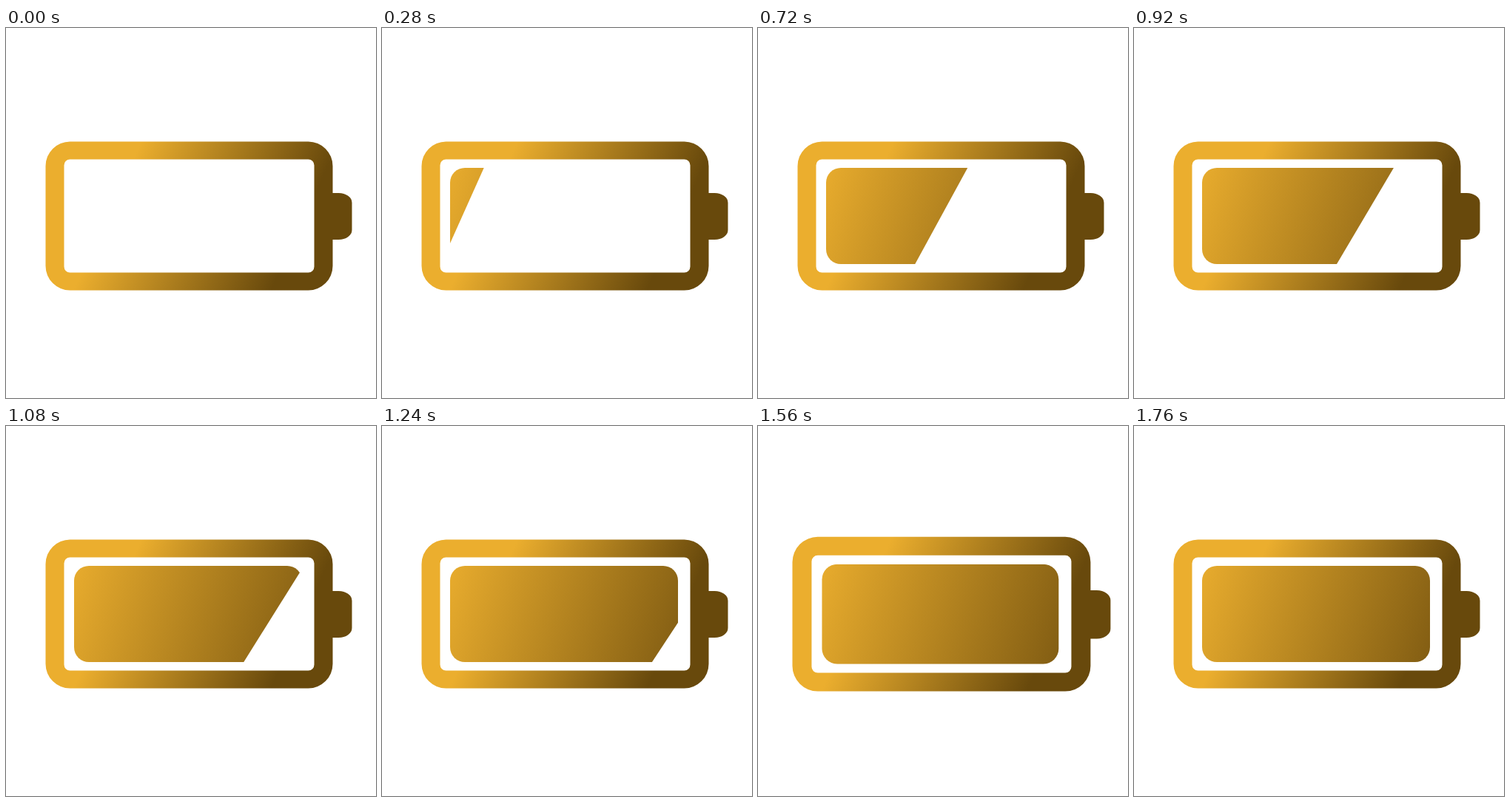
Animation of 500 by 500 pixels, one loop 1.92 s. Source, as an HTML page:

```html
<!DOCTYPE html>
<html lang="en">
<head>
<meta charset="utf-8">
<title>Charging battery</title>
<style>
  html, body { margin: 0; width: 100%; height: 100%; overflow: hidden; background: #fff; }
  svg { display: block; width: 100%; height: 100%; }
</style>
</head>
<body>
<svg viewBox="0 0 500 500">
  <defs>
    <linearGradient id="gold">
      <stop offset="0" stop-color="#ebae2e"/>
      <stop offset="1" stop-color="#68490c"/>
    </linearGradient>
    <linearGradient id="caseGold" href="#gold" gradientUnits="userSpaceOnUse" x1="179" y1="162" x2="400" y2="263"/>
    <linearGradient id="chargeGold" href="#gold" gradientUnits="userSpaceOnUse" x1="75" y1="205" x2="485" y2="338"/>
    <clipPath id="level"><polygon id="edge"/></clipPath>
  </defs>
  <g id="battery">
    <path fill="url(#caseGold)" fill-rule="evenodd" d="
      M86.5 153.5H408.5a33 33 0 0 1 33 33V223H449.5a18 13 0 0 1 18 13V273a18 13 0 0 1 -18 13H441.5V321.5a33 33 0 0 1 -33 33H86.5a33 33 0 0 1 -33 -33V186.5a33 33 0 0 1 33 -33Z
      M86.5 177.5a8 8 0 0 0 -8 8V322.5a8 8 0 0 0 8 8H408.5a8 8 0 0 0 8 -8V185.5a8 8 0 0 0 -8 -8Z"/>
    <rect x="92" y="189" width="308" height="130" rx="20" fill="url(#chargeGold)" clip-path="url(#level)"/>
  </g>
</svg>
<script>
  const LOOP = 1920, STEP = 40;
  const FILL_START = 160, FILL_END = 1280;
  const PULSE_MID = 1500, PULSE_HALF = 260, PULSE_SIZE = 0.05;
  const battery = document.getElementById('battery');
  const edge = document.getElementById('edge');

  // Slanted front of the charge: its x at the top and bottom of the bar.
  function front(t) {
    if (t < FILL_START) return [0, 0];
    if (t >= FILL_END) return [500, 500];
    const s = Math.sin((t - 700) / 915);
    return [276.4 + 313 * s, 206 + 285.6 * s];
  }

  function draw(now) {
    const t = Math.floor(now % LOOP / STEP) * STEP;
    const [top, bottom] = front(t);
    edge.setAttribute('points', `0,189 ${top},189 ${bottom},319 0,319`);

    const pulse = Math.max(0, 1 - Math.abs(t - PULSE_MID) / PULSE_HALF);
    const scale = 1 + PULSE_SIZE * pulse;
    battery.setAttribute('transform', `translate(236 250) scale(${scale}) translate(-236 -250)`);
  }

  function tick() {
    draw(performance.now());
    requestAnimationFrame(tick);
  }
  tick();
</script>
</body>
</html>
```
